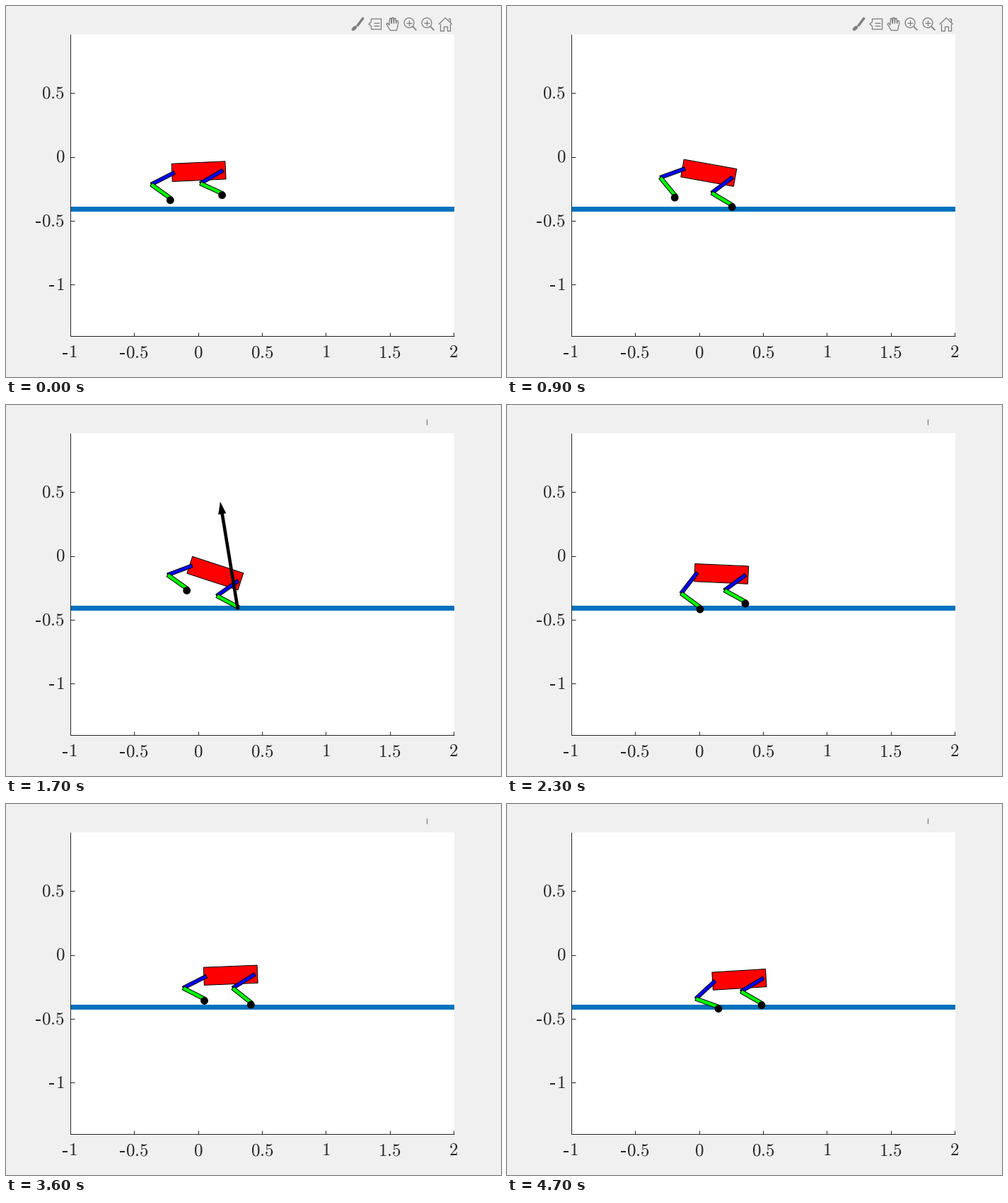
Write a matplotlib script that moves like this. It is 700 px wide and 525 px high and loops after 6.7 s.

```python
import math
import numpy as np
import matplotlib.pyplot as plt
from matplotlib.animation import FuncAnimation
from matplotlib.patches import Circle, Ellipse, Polygon, Rectangle

plt.rcParams["mathtext.fontset"] = "cm"
W, H, DPI = 700, 525, 100
PX = 72 / DPI                      # points per pixel
INK, GRAY = "#262626", "#7f7f7f"
MOVING, TOTAL, TOOLBAR_UNTIL = 47, 67, 16

fig = plt.figure(figsize=(W / DPI, H / DPI), dpi=DPI, facecolor="#f0f0f0")
ax = fig.add_axes([0, 0, 1, 1])
ax.set_xlim(0, W)
ax.set_ylim(H, 0)
ax.axis("off")


def line(points, color=INK, width=1.0, z=1, **kw):
    xs, ys = zip(*points)
    return ax.plot(xs, ys, color=color, lw=width * PX, zorder=z,
                   solid_capstyle="butt", **kw)[0]


def shape(corners, fill, z, width=1.0):
    return ax.add_patch(Polygon(np.zeros((corners, 2)), closed=True, fc=fill,
                                ec="black", lw=width * PX, joinstyle="miter", zorder=z))


# ---- axes ----
LEFT, RIGHT, TOP, BOTTOM = 91, 633, 39.5, 467
UNIT, ZERO_Y = (RIGHT - LEFT) / 3, 213.7
EM = 25


def label(value, x, baseline, align):
    """Computer Modern number with a short hyphen as its sign."""
    digits = f"{abs(value):g}"
    dash = 0.333 * EM if value < 0 else 0
    width = dash + sum(0.278 if c == "." else 0.5 for c in digits) * EM
    x -= width * align + 0.5
    if dash:
        ax.add_patch(Rectangle((x + 0.3, baseline - 6.3), 6.7, 1.6, fc=INK, lw=0))
    ax.text(x + dash, baseline, f"${digits}$", fontsize=EM * PX, color=INK,
            ha="left", va="baseline")


ax.add_patch(Rectangle((LEFT, TOP), RIGHT + 1 - LEFT, BOTTOM - TOP,
                       fc="white", lw=0, zorder=0))
line([(LEFT, TOP), (LEFT, BOTTOM), (RIGHT + 1, BOTTOM)])
for value in np.arange(-1, 2.1, 0.5):
    x = LEFT + (value + 1) * UNIT
    line([(x, BOTTOM), (x, BOTTOM - 5.5)])
    label(value, x, 497.3, 0.5)
for value in np.arange(-1, 0.6, 0.5):
    y = ZERO_Y - value * UNIT
    line([(LEFT, y), (LEFT + 6, y)])
    label(value, 82.5, y + 7.2, 1)
ax.add_patch(Rectangle((LEFT + 0.5, 284), RIGHT + 0.5 - LEFT, 7,
                       fc="#0072bd", lw=0, zorder=2))


# ---- toolbar ----
def stroke(points, width=1.3):
    return line(points, GRAY, width, solid_joinstyle="round")


def brush(x, y):
    blob = Ellipse((x - 5, y + 6), 9, 5, angle=-40, fc=GRAY, lw=0)
    return [stroke([(x + 8, y - 9), (x - 1, y + 3)], 3.4), ax.add_patch(blob)]


def data_tip(x, y):
    l, r, t, b = x - 5.5, x + 8.6, y - 7.2, y + 7.5
    return [stroke([(l, y - 3), (l, t), (r, t), (r, b), (l, b), (l, y + 3),
                    (l - 3.5, y), (l, y - 3)])] + [
            stroke([(x - 2.5, y + dy), (x + 5.5, y + dy)]) for dy in (-2, 2)]


def hand(x, y):
    outline = [(x - 3, y + 9), (x - 8.5, y), (x - 7, y - 1.5), (x - 4.5, y + 1.5)]
    for i in range(4):
        left, tip = x - 4.5 + 3.2 * i, y - 9 + 1.1 * (i - 1) ** 2
        outline += [(left, y - 1), (left + 0.6, tip), (left + 2.6, tip), (left + 3.2, y - 1)]
    return [stroke(outline + [(x + 6, y + 9), (x - 3, y + 9)])]


def magnifier(x, y, plus):
    parts = [ax.add_patch(Circle((x, y), 6.9, fc="none", ec=GRAY, lw=1.3 * PX)),
             stroke([(x + 5, y + 5), (x + 10.3, y + 10.5)], 1.8),
             stroke([(x - 3.7, y), (x + 3.7, y)])]
    return parts + [stroke([(x, y - 3.7), (x, y + 3.7)])] * plus


def house(x, y):
    half = [(7, -1), (7, 9), (2.4, 9), (2.4, 3)]
    walls = [(x - a, y + b) for a, b in half] + [(x + a, y + b) for a, b in half[::-1]]
    return [stroke(walls), stroke([(x - 9.5, y + 0.5), (x, y - 8.7), (x + 9.5, y + 0.5)]),
            stroke([(x + 4, y - 8), (x + 6.8, y - 8), (x + 6.8, y - 3)])]


toolbar = (brush(497.5, 25.5) + data_tip(522, 25.5) + hand(546.5, 25.5)
           + magnifier(570, 23.8, True) + magnifier(595, 23.8, False)
           + house(621.3, 25.5))

# ---- motion ----
# Each push: leg, middle and half of its duration, peak force, turning kick (deg/frame)
PUSHES = [("rear", 3.5, 3.5, (8, -103), 4.29), ("front", 14.5, 5, (-26.5, -162), -5.98),
          ("rear", 27.2, 3.6, (9, -115), 3.71), ("front", 41, 2.6, (-8, -67.5), -1.7)]
GRAVITY, LIFT = 0.0401, 0.000794

# Each stance: landing time, lift-off time, x at both, height of the next swing
REAR_STEPS = [(-20, -13, 229, 229, 12), (2, 6, 233, 233, 29),
              (23, 32, 273, 276.5, 15), (47, 48, 299, 299, 0)]
FRONT_STEPS = [(-20, -9, 281, 281, 12), (10, 20, 319.5, 331.5, 16),
               (38, 43, 347.5, 349, 5), (52, 53, 367, 367, 0)]


def gain(t, mid, half):
    """Distance gained by time t from a unit kick spread over mid +- half."""
    inside = np.clip(t - mid + half, 0, 2 * half)
    return inside ** 2 / (4 * half) + max(t - mid - half, 0)


def body_pose(t):
    x = 272.6 + 1.466 * t - 0.0059 * t * t
    y = 234.1 + 0.2276 * t + GRAVITY * t * t / 2
    pitch = -2.6 - 1.2 * t
    for _, mid, half, force, kick in PUSHES:
        g = gain(t, mid, half)
        y += LIFT * force[1] * half * g
        pitch += kick * g
    return np.array([x, y]), math.radians(pitch)


def foot_point(steps, reach, t):
    floor = 289.7 - 10 * math.exp(-t / 8)
    for (land, lift, x0, x1, hop), (land2, _, x2, *_) in zip(steps, steps[1:]):
        if t <= lift:
            return np.array([x0 + (x1 - x0) * (t - land) / (lift - land), floor])
        if t <= land2:
            u = (t - lift) / (land2 - lift)
            return np.array([x1 + (x2 - x1) * u ** reach, floor - hop * math.sin(math.pi * u)])


# ---- robot ----
THIGH, SHIN, HIP = 37, 35, 34.3


def bar(a, b, width):
    d = (b - a) / np.hypot(*(b - a))
    n = np.array([d[1], -d[0]]) * width / 2
    return np.array([a + n, b + n, b - n, a - n])


def knee_point(hip, foot):
    span = foot - hip
    dist = np.hypot(*span)
    along = (THIGH ** 2 - SHIN ** 2 + dist ** 2) / (2 * dist)
    side = math.sqrt(max(THIGH ** 2 - along ** 2, 0))
    d = span / dist
    return hip + along * d + side * np.array([-d[1], d[0]])


class Leg:
    def __init__(self, side, steps, reach):
        self.side, self.steps, self.reach = side, steps, reach
        self.thigh = shape(4, "#0000ff", 5)
        self.shin = shape(4, "#00ff00", 6)
        self.ball = ax.add_patch(Circle((0, 0), 5.4, fc="black", lw=0, zorder=7))

    def place(self, t, centre, axis):
        hip = centre + self.side * HIP * axis
        foot = foot_point(self.steps, self.reach, t)
        knee = knee_point(hip, foot)
        d = (foot - knee) / SHIN
        self.thigh.set_xy(bar(hip, knee, 5))
        self.shin.set_xy(bar(knee, foot + 2.4 * np.array([d[1], -d[0]]), 5.4))
        self.ball.center = foot
        self.ball.set_visible(True)
        return foot


body = shape(4, "#ff0000", 4)
legs = {"rear": Leg(-1, REAR_STEPS, 1.3), "front": Leg(1, FRONT_STEPS, 0.6)}
shaft = line([(0, 0), (0, 0)], "black", 4.6, 8)
head = shape(3, "black", 8, 0.5)


def draw_force(foot, vector):
    start = foot + (0, 1)
    length = np.hypot(*vector)
    d = vector / length
    n = np.array([-d[1], d[0]]) * 5.2
    tip = start + vector
    neck = tip - 0.107 * vector
    shaft.set_data(*zip(start, neck + d))
    head.set_xy([tip, neck + n, neck - n])


def update(frame):
    t = min(frame, MOVING)
    for part in toolbar:
        part.set_visible(frame < TOOLBAR_UNTIL)
    centre, pitch = body_pose(t)
    axis = np.array([math.cos(pitch), math.sin(pitch)])
    body.set_xy(bar(centre - 37.9 * axis, centre + 37.9 * axis, 25.2))
    feet = {name: leg.place(t, centre, axis) for name, leg in legs.items()}
    pushing = False
    for name, mid, half, peak, _ in PUSHES:
        strength = 1 - ((t - mid) / half) ** 4
        if strength > 0.01:
            draw_force(feet[name], np.array(peak) * strength)
            legs[name].ball.set_visible(False)
            pushing = True
    shaft.set_visible(pushing)
    head.set_visible(pushing)
    return []


anim = FuncAnimation(fig, update, frames=TOTAL, interval=100, repeat=True,
                     repeat_delay=0, blit=False)
plt.show()
```
